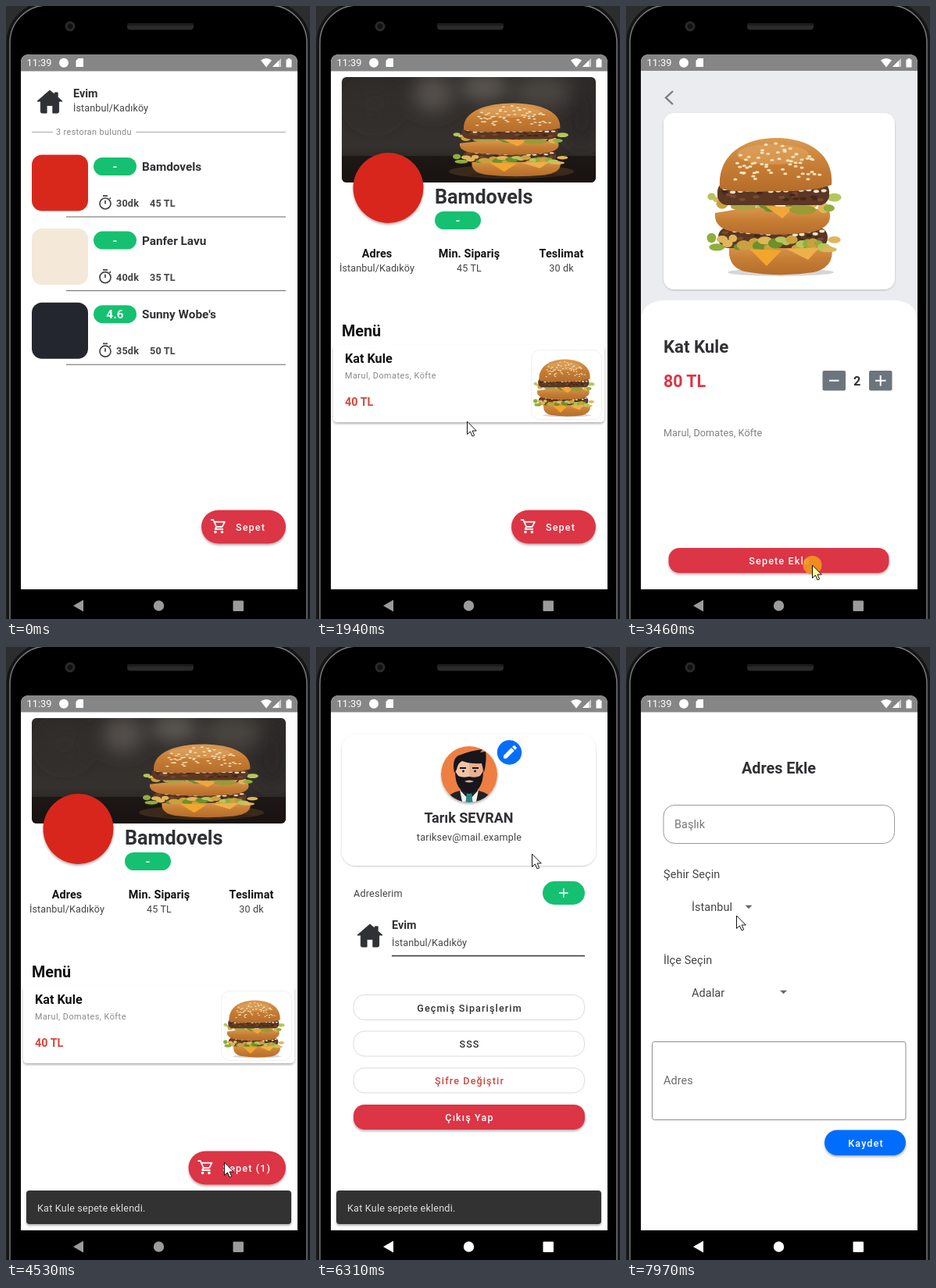
Animation, 389 px wide and 785 px high, one loop 8000 ms. Source, as an HTML page:

```html
<!DOCTYPE html>
<html lang="tr">
<head>
<meta charset="utf-8">
<style>
html,body{margin:0;width:100%;height:100%;overflow:hidden;background:#2c2d2f}
svg{display:block;width:100vw;height:100vh}
text{font-family:Roboto,"Noto Sans",sans-serif;white-space:pre}
</style>
</head>
<body>
<svg id="stage" viewBox="0 0 389 785" xmlns="http://www.w3.org/2000/svg"></svg>
<script>
const LOOP = 8000;
const RED = '#dc3545', GREEN = '#15c170', BLUE = '#056dfd', INK = '#303134';
const TILE = ['#d8281c', '#f4e8d9', '#23252f'];
const PLACE = 'İstanbul/Kadıköy', DISH = 'Kat Kule', PARTS = 'Marul, Domates, Köfte';
const SHOPS = [
  ['Bamdovels', '-', '30dk', '45 TL'],
  ['Panfer Lavu', '-', '40dk', '35 TL'],
  ["Sunny Wobe's", '4.6', '35dk', '50 TL']
];

// Drawing helpers
const text = (x, y, s, size, o = {}) =>
  `<text x="${x}" y="${y}" font-size="${size}" font-weight="${o.w || 400}" fill="${o.c || '#444'}"` +
  ` letter-spacing="${o.ls ?? 0.1}" text-anchor="${o.a || 'start'}"${o.id ? ` id="${o.id}"` : ''}>${s}</text>`;
const bold = (x, y, s, size, o = {}) => text(x, y, s, size, {w: 700, c: INK, ls: 0, ...o});
const mid = (x, y, s, size, o = {}) => text(x, y, s, size, {a: 'middle', ...o});
const label = (x, y, s, c = '#fff') => text(x + 0.5, y, s, 12.6, {w: 500, ls: 1.12, a: 'middle', c});
const box = (x, y, x2, y2, r, fill, more = '') =>
  `<rect x="${x}" y="${y}" width="${x2 - x}" height="${y2 - y}" rx="${r}" fill="${fill}" ${more}/>`;
const disc = (x, y, r, fill, more = '') => `<circle cx="${x}" cy="${y}" r="${r}" fill="${fill}" ${more}/>`;
const oval = (x, y, a, b, fill, more = '') =>
  `<ellipse cx="${x}" cy="${y}" rx="${a}" ry="${b}" fill="${fill}" ${more}/>`;
const path = (d, fill, more = '') => `<path d="${d}" fill="${fill}" ${more}/>`;
const rule = (x, x2, y, c, w = 1) => path(`M${x} ${y}H${x2}`, 'none', `stroke="${c}" stroke-width="${w}"`);
const group = (id, body) => `<g id="${id}">${body}</g>`;
const outline = c => `stroke="${c}"`;
const SHADOW = 'filter="url(#shadow)"', SOFT = 'filter="url(#soft)"';

const house = (x, y) => path('M17.5 1 1 15.5h4.5V29q0 2 2 2h6V21h8v10h6q2 0 2-2V15.5H34L28 10V4h-4v2.5Z', INK,
  `stroke="${INK}" stroke-linejoin="round" transform="translate(${x} ${y}) scale(.97)"`);
const address = (x, y, hx, hy, gap) =>
  house(hx, hy) + bold(x, y, 'Evim', 14.4) + text(x, y + gap, PLACE, 12.6);
const badge = (x, y, x2, s) => box(x, y, x2, y + 23, 11.5, GREEN) +
  mid((x + x2) / 2, y + 17, s, 15.3, {w: 700, c: '#fff'});
const triangle = (x, y) => path(`M${x - 4.5} ${y - 2.3}h9l-4.5 4.6z`, '#666');
const spinner = id => `<circle id="${id}" r="15.4" fill="none" stroke="#3b7fe4" stroke-width="4"/>`;

// Seeded crumbs, leaves and sesame seeds
function scatter(n, seed, put) {
  let s = seed, out = '';
  const rnd = () => (s = s * 16807 % 2147483647) / 2147483647;
  for (let i = 0; i < n; i++) out += put(rnd, (i + 0.5) / n);
  return out;
}
const leaves = (x, x2, y, seed) => scatter(24, seed, (r, k) => oval(
  x + (x2 - x) * k, y + r() * 15, 5 + r() * 5, 3 + r() * 4,
  ['#8fae3c', '#6d8f2c', '#b5c75a', '#e0b65a', '#c9a23d'][r() * 5 | 0]));
const patty = (x, x2, y, y2, seed) => box(x, y, x2, y2, 13, '#5b3724') + scatter(26, seed, r => oval(
  x + 9 + r() * (x2 - x - 18), y + 5 + r() * (y2 - y - 10), 4, 2, r() < 0.5 ? '#784a30' : '#452719'));
const onions = (x, x2, y, seed) => scatter(14, seed, (r, k) =>
  oval(x + (x2 - x) * k, y + r() * 5, 3.5, 2, '#efe6cf'));

const burger = oval(198, 341, 68, 5, '#000', 'opacity=".16"') +
  path('M132 310Q195 300 263 308Q268 334 240 341Q196 348 152 340Q130 334 132 310Z', 'url(#bun)') +
  patty(118, 258, 283, 310, 77) + leaves(106, 270, 297, 9) +
  path('M158 311 199 313 180 333Z', '#f3a62d') + path('M205 311 248 309 233 325Z', '#eeb04a') +
  onions(135, 255, 288, 31) +
  path('M114 265Q190 250 260 262Q266 282 240 289Q190 297 132 288Q112 282 114 265Z', 'url(#bun)') +
  leaves(106, 270, 244, 23) + path('M178 256 216 257 200 272Z', '#f1a63a') +
  oval(226, 261, 17, 6, '#9b9a35') + oval(150, 257, 16, 5, '#a9a445') +
  patty(117, 260, 225, 255, 41) + onions(122, 258, 234, 14) +
  path('M120 233C117 191 150 169 192 169C237 169 266 192 263 229Q240 238 190 237Q140 240 120 233Z', 'url(#bun)') +
  oval(188, 190, 46, 13, '#e5ad68', 'opacity=".45"') +
  scatter(60, 5, r => {
    const a = Math.PI * (1 + r()), d = Math.sqrt(r());
    return oval(191 + 63 * d * Math.cos(a), 222 + 48 * d * Math.sin(a), 2.6, 1.5, '#f6e3bd');
  });
const burgerAt = (x, y, sx, sy) => `<use href="#burger" transform="translate(${x} ${y}) scale(${sx} ${sy})"/>`;

// Cartoon portrait, radius 36
const portrait = disc(0, 0, 36, '#ee7f42') + `<g clip-path="url(#face)">` +
  path('M-32 40Q-29 24-12 21L0 17 12 21Q29 24 32 40Z', '#202026') +
  path('M-12 20 0 33 12 20 8 40H-8Z', '#f6f6f4') + path('M-3 23H3L5 40H-5Z', '#26877d') +
  box(-8, 8, 8, 24, 5, '#dfa07d') +
  path('M-17-17H17V5Q14 21 0 22Q-14 21-17 5Z', '#f3c3a5') +
  path('M0-17H17V5Q14 21 0 22Z', '#e9b090') +
  path('M-18-4-14 2Q-9 5 0 3Q9 5 14 2L18-4Q18 22 0 25Q-18 22-18-4Z', '#17161b') +
  path('M-6 9Q0 6 6 9Q0 12-6 9Z', '#e6a58b') +
  path('M-19-2Q-23-22-11-25Q1-30 17-32L14-28 21-29Q23-20 19-2L16-14Q2-13-9-17Q-15-14-16-6Z', '#17161b') +
  path('M-12-8h8M4-8h8', 'none', 'stroke="#17161b" stroke-width="2"') +
  disc(-7.5, -4, 1.4, '#17161b') + disc(7.5, -4, 1.4, '#17161b') + '</g>';
const portraitAt = (x, y, k) => `<g transform="translate(${x} ${y}) scale(${k})" ${SHADOW}>${portrait}</g>`;

// Pages
const shopRow = ([name, score, time, least], i) => `<g transform="translate(0 ${i * 94.6})">` +
  box(33, 190.5, 105, 262.5, 13, TILE[i]) + badge(112, 194, 167, score) + bold(174, 211, name, 15.3) +
  `<g fill="none" stroke="#444" stroke-width="1.7"><circle cx="127" cy="253" r="7"/>` +
  `<path d="M124 243.2h6M127 249v4.5M132.5 247l1.5-1.5"/></g>` +
  text(141, 257, time, 12.6, {w: 700, ls: .2}) + text(184, 257, least, 12.6, {w: 700, ls: .2}) +
  rule(77, 358, 270, '#666') + '</g>';

const list = address(86, 117, 39, 107, 17.5) +
  rule(33, 60, 161.5, '#aaa') + rule(166, 358, 161.5, '#aaa') +
  text(64, 165, '3 restoran bulundu', 10.8, {c: '#868686', ls: .4}) + SHOPS.map(shopRow).join('');

const fact = (x, a, b) => mid(x, 322, a, 14.4, {w: 700, c: '#111'}) + mid(x, 340, b, 12.6);
const shop = `<g clip-path="url(#hero)">` + box(33, 91, 358, 226, 0, 'url(#dark)') +
  `<g filter="url(#blur)">` + oval(150, 112, 26, 24, '#54504c') + oval(215, 104, 30, 18, '#5b5651') +
  oval(290, 110, 38, 22, '#484440') + oval(75, 125, 30, 28, '#302d2b') + oval(340, 140, 24, 40, '#2b2826') + '</g>' +
  box(33, 192, 358, 226, 0, '#17120f', 'opacity=".75"') + oval(250, 212, 80, 9, '#3b2a1b') +
  burgerAt(86, 34, .86, .535) + '</g>' +
  disc(92.5, 233, 45, TILE[0], SHADOW) + bold(152, 253, SHOPS[0][0], 25.2) + badge(152, 263, 211, '-') +
  fact(78, 'Adres', PLACE) + fact(196, 'Min. Sipariş', '45 TL') + fact(314, 'Teslimat', '30 dk') +
  spinner('wait') + group('menu',
    bold(33, 423, 'Menü', 19.8, {c: '#111'}) + box(22, 434, 369, 533, 5, '#fff', SHADOW) +
    bold(37, 456.5, DISH, 16.2, {c: '#111'}) + text(37, 477, PARTS, 10.8, {c: '#888', ls: .5}) +
    bold(37, 512, '40 TL', 14.4, {c: '#d4483f'}) + box(275.5, 440.5, 365.5, 529.5, 11, '#fff', outline('#f0f0f0')) +
    burgerAt(231, 382, .455, .417));

const step = (x, d) => box(x, 467, x + 29.5, 492.5, 2, '#6c757d') +
  path(d, 'none', 'stroke="#fff" stroke-width="2"');
const detail = box(19, 83, 373, 747, 0, '#ebecf0') +
  path('M60 109 51 117.5 60 126', 'none', 'stroke="#7b7c80" stroke-width="2.4"') +
  box(48, 137, 344, 363, 14, '#fff', SOFT) + burgerAt(0, 0, 1, 1) +
  path('M19 747V407Q19 377 49 377H343Q373 377 373 407V747Z', '#fff') +
  bold(48, 444, DISH, 22.2) + bold(48, 488, '', 21.4, {c: RED, id: 'price'}) +
  step(251.5, 'M260 479.7h12.5') + step(311, 'M319 479.7h13.5M325.7 473v13.5') +
  bold(295.7, 486, '', 16.2, {a: 'middle', id: 'count'}) + text(48, 551, PARTS, 12.6, {c: '#808080'}) +
  box(54.5, 694, 336.5, 726, 14, RED, SHADOW) + label(196, 715, 'Sepete Ekle');

const home = text(33, 130, 'Merhaba Tarık,', 12.6, {ls: .2}) + bold(33, 156.5, 'Hoşgeldin!', 21.8) +
  portraitAt(331, 139, .75) + bold(33, 210, 'Popüler', 18.1) + text(33, 258, 'Adreslerim', 12.6, {ls: .2}) +
  address(83, 288, 37, 280, 21) + rule(83, 358, 322.5, '#444') +
  text(33, 395, 'Geçmiş Siparişlerim', 12.6, {ls: .2}) + spinner('busy') +
  box(33.5, 427.5, 188, 634, 14, '#fff', outline('#444')) + disc(111, 478, 36, TILE[2]) +
  mid(111, 528, '2021-08-22', 9.9, {c: '#8a8a8a', ls: 0}) + bold(110.5, 550, SHOPS[2][0], 14.4, {a: 'middle'}) +
  mid(111, 565, PLACE, 10.8) + bold(111, 608, '385 TL', 16.4, {a: 'middle', c: '#3b8061'});

const option = (y, s, c) => box(48, y, 343.5, y + 32, 14, '#fff', outline('#dcdcdc')) + label(196, y + 21, s, c);
const profile = box(33, 112, 358, 280, 18, '#fff', SOFT) + portraitAt(196, 163, 1) +
  disc(247.5, 135, 15.7, BLUE) +
  path('M240 139v3.8h3.8l10-10-3.8-3.8zM251 128l1.5-1.5q1-1 2 0l1.8 1.8q1 1 0 2l-1.5 1.5z', '#fff') +
  bold(195.5, 225, 'Tarık SEVRAN', 18, {a: 'middle'}) + mid(196, 248, 'tariksev@mail.example', 12.6, {ls: .2}) +
  text(48, 320, 'Adreslerim', 12.6, {ls: .2}) + box(290, 300, 344, 330, 15, GREEN) +
  path('M311 315h11.5M316.8 309.3v11.5', 'none', 'stroke="#fff" stroke-width="1.6"') +
  address(97, 361, 52, 354, 22) + rule(97, 344, 395.5, '#333', 1.5) +
  option(445.5, 'Geçmiş Siparişlerim', INK) + option(492, 'SSS', INK) + option(539, 'Şifre Değiştir', '#cf4640') +
  box(48, 586, 344, 618, 14, RED, SHADOW) + label(196, 607, 'Çıkış Yap');

const form = bold(195.5, 162, 'Adres Ekle', 19.8, {a: 'middle'}) +
  box(48, 202.5, 343.5, 251.5, 14, '#fff', outline('#999')) + text(62, 232, 'Başlık', 14.4, {c: '#777'}) +
  text(48, 296, 'Şehir Seçin', 14.4) + text(84, 338, 'İstanbul', 14.4) + triangle(157, 333) +
  text(48, 406, 'İlçe Seçin', 14.4) + text(84, 447.5, 'Adalar', 14.4) + triangle(201.5, 442) +
  box(33.5, 505.5, 358, 605.5, 3, '#fff', outline('#8c8c8c')) + text(48, 560, 'Adres', 14.4, {c: '#6c6c6c'}) +
  box(254, 618.5, 358, 651, 16.2, BLUE, SHADOW) + label(306.5, 640, 'Kaydet');

const pages = {list, shop, detail, home, profile, form};

const defs = `<defs>
<filter id="shadow" x="-15%" y="-15%" width="130%" height="150%"><feDropShadow dx="0" dy="2" stdDeviation="1.8" flood-opacity=".3"/></filter>
<filter id="soft" x="-5%" y="-5%" width="110%" height="112%"><feDropShadow dx="0" dy="1" stdDeviation="1.1" flood-opacity=".22"/></filter>
<filter id="blur"><feGaussianBlur stdDeviation="11"/></filter>
<linearGradient id="bun" x2="0" y2="1"><stop stop-color="#d99a51"/><stop offset=".5" stop-color="#c67d34"/><stop offset="1" stop-color="#b56d2b"/></linearGradient>
<linearGradient id="dark" x2="0" y2="1"><stop stop-color="#2d2a28"/><stop offset=".65" stop-color="#35312e"/><stop offset="1" stop-color="#1c1714"/></linearGradient>
<clipPath id="hero">${box(33, 91, 358, 226, 6, '#000')}</clipPath>
<clipPath id="face">${disc(0, 0, 36, '#000')}</clipPath>
<g id="burger">${burger}</g></defs>`;

const phone = box(0, 0, 389, 785, 0, '#2c2d2f') +
  box(3, -3, 387, 850, 50, '#000', 'stroke="#151515" stroke-width="5"') +
  box(5, -1, 385, 850, 48, '#000', 'stroke="#77787a" stroke-width="1.5"') +
  disc(82, 26, 6.5, '#2a2a2b') + disc(82, 26, 3.5, '#111216') +
  box(155, 22, 240, 30.5, 4, '#2a2a2b') + box(155, 22, 240, 25, 1.5, '#1c1c1d') +
  path('M19 747V73Q19 62 30 62H362Q373 62 373 73V747Z', '#fff') +
  path('M19 83.5V73Q19 62 30 62H362Q373 62 373 73V83.5Z', '#868686');

const status = text(26.5, 77.3, '11:39', 12.8, {c: '#fff', ls: 0}) + disc(74, 72.8, 6, '#fff') +
  path('M92.5 67H99V78H89.5V70Z', '#fff') +
  path('M333 78.5 326 69.5Q333 64.5 340 69.5Z', '#fff') +
  path('M341 78H352V67Z', '#fff', 'fill-opacity=".6"') + path('M341 78H349V70Z', '#fff') +
  path('M358.5 68.5H360.5V67H363.5V68.5H365.5V78.5H358.5Z', '#fff');

const cart = path('M0 0h3.2l4 9h7.4l3.3-6.3H4.2M7.2 9l-1.6 3H16', 'none',
  'stroke="#fff" stroke-width="1.8" stroke-linejoin="round"') + disc(6, 15.6, 1.8, '#fff') + disc(14.4, 15.6, 1.8, '#fff');

const nav = box(48, 747, 139, 800, 18, '#232323', 'id="ripple"') +
  group('keys', path('M86 768 99 760.5V775.5Z', 'inherit') + disc(195.5, 768, 6.7, 'inherit') +
    box(290.5, 761.5, 304, 775, 1, 'inherit')).replaceAll('fill="inherit"', '');

const fab = (id, x, s) => group(id, box(x, 645.5, 358, 688.5, 21.5, RED, SHADOW) +
  `<g transform="translate(${x + 12} 658)">${cart}</g>` + text(x + 44, 672, s, 12.6, {w: 500, ls: 1.12, c: '#fff'}));

const stage = document.getElementById('stage');
stage.innerHTML = defs + phone + status +
  Object.entries(pages).map(([id, body]) => group(id, body)).join('') +
  fab('cart0', 250, 'Sepet') + fab('cart1', 233.5, 'Sepet (1)') +
  group('snack', box(26, 696, 365, 739, 4, '#323232', SHADOW) +
    text(40, 723, DISH + ' sepete eklendi.', 12.6, {c: '#dedede', ls: .2})) + nav +
  disc(0, 0, 12, '#f39a1c', 'id="press" opacity=".88"') +
  path('M0 0V16.5L3.9 13 6.6 19 9.2 17.8 6.6 12H11.8Z', '#fff', 'id="cursor" stroke="#111" stroke-linejoin="round"');

const el = {};
stage.querySelectorAll('[id]').forEach(n => el[n.id] = n);

// Timeline
const SCENES = [[0, 'list'], [930, 'shop'], [2200, 'detail'], [3570, 'shop'], [5070, 'list'],
  [5370, 'home'], [6240, 'profile'], [6850, 'form']];
const CLICKS = [[820, 930], [2090, 2200], [2660, 2750], [3390, 3540], [4960, 5060], [5260, 5350], [6130, 6230], [6750, 6840]];
const MOVES = [[70, 328, 768], [800, 222, 245], [930, 222, 245], [1400, 308, 659], [1500, 308, 659], [1940, 193.5, 532],
  [2080, 190, 490], [2200, 190, 490], [2530, 330, 450], [2640, 326, 480], [2800, 326, 480], [3330, 238.5, 716],
  [3530, 238.5, 716], [4200, 279.5, 660], [4530, 279.5, 660], [4950, 94, 768], [5340, 94, 768], [5590, 139, 508],
  [6050, 325, 146], [6200, 325, 146], [6310, 276.5, 265], [6720, 318, 315], [6850, 318, 315], [7250, 300, 756],
  [7500, 120, 560], [7750, 150, 238], [7910, 152, 296], [7970, 141.5, 344]];

const clamp = v => Math.min(1, Math.max(0, v));
const within = (t, a, b) => t >= a && t < b;
const show = (node, on) => node.style.display = on ? '' : 'none';

function pointer(t) {
  const i = MOVES.findIndex(m => m[0] > t);
  if (i < 0) return MOVES[MOVES.length - 1].slice(1);
  if (i === 0) return MOVES[0].slice(1);
  const [t0, x0, y0] = MOVES[i - 1], [t1, x1, y1] = MOVES[i];
  const k = (t - t0) / (t1 - t0), e = k * k * (3 - 2 * k);
  return [x0 + (x1 - x0) * e, y0 + (y1 - y0) * e];
}

function spin(node, y, t, on) {
  show(node, on);
  const len = 12 + 18 * (1 - Math.cos((t - 5590) / 300));
  node.setAttribute('stroke-dasharray', `${len} 200`);
  node.setAttribute('transform', `translate(196 ${y}) rotate(${-72 + (t - 5590) * 0.4})`);
}

function render(t) {
  const page = SCENES.filter(s => s[0] <= t).pop()[1];
  for (const id in pages) show(el[id], id === page);

  const added = t >= 3570;
  const hasCart = ['list', 'shop', 'home'].includes(page);
  show(el.cart0, hasCart && !added);
  show(el.cart1, hasCart && added);

  const loading = within(t, 930, 1270);
  show(el.menu, !loading);
  spin(el.wait, 378, t, loading);
  spin(el.busy, 414, t, t < 5950);

  const two = t >= 2740;
  el.price.textContent = two ? '80 TL' : '40 TL';
  el.count.textContent = two ? '2' : '1';

  const rise = clamp((t - 3600) / 150), k = 0.8 + 0.2 * rise;
  el.snack.setAttribute('opacity', rise * (1 - clamp((t - 6400) / 130)));
  el.snack.setAttribute('transform', `translate(${195.5 * (1 - k)} ${717.5 * (1 - k)}) scale(${k})`);

  el.keys.setAttribute('fill', t < 4980 ? '#9b9b9b' : '#fff');
  el.ripple.setAttribute('opacity', clamp((t - 4970) / 80) * (1 - clamp((t - 5600) / 150)));

  const [x, y] = pointer(t), down = CLICKS.some(c => within(t, ...c));
  const at = `translate(${x} ${y})`;
  show(el.cursor, t >= 70);
  show(el.press, down);
  el.cursor.setAttribute('transform', at);
  el.cursor.setAttribute('fill', down ? '#fff7a0' : '#fff');
  el.press.setAttribute('transform', at);
}

const start = performance.now();
function tick() {
  render((performance.now() - start) % LOOP);
  requestAnimationFrame(tick);
}
tick();
</script>
</body>
</html>
```
